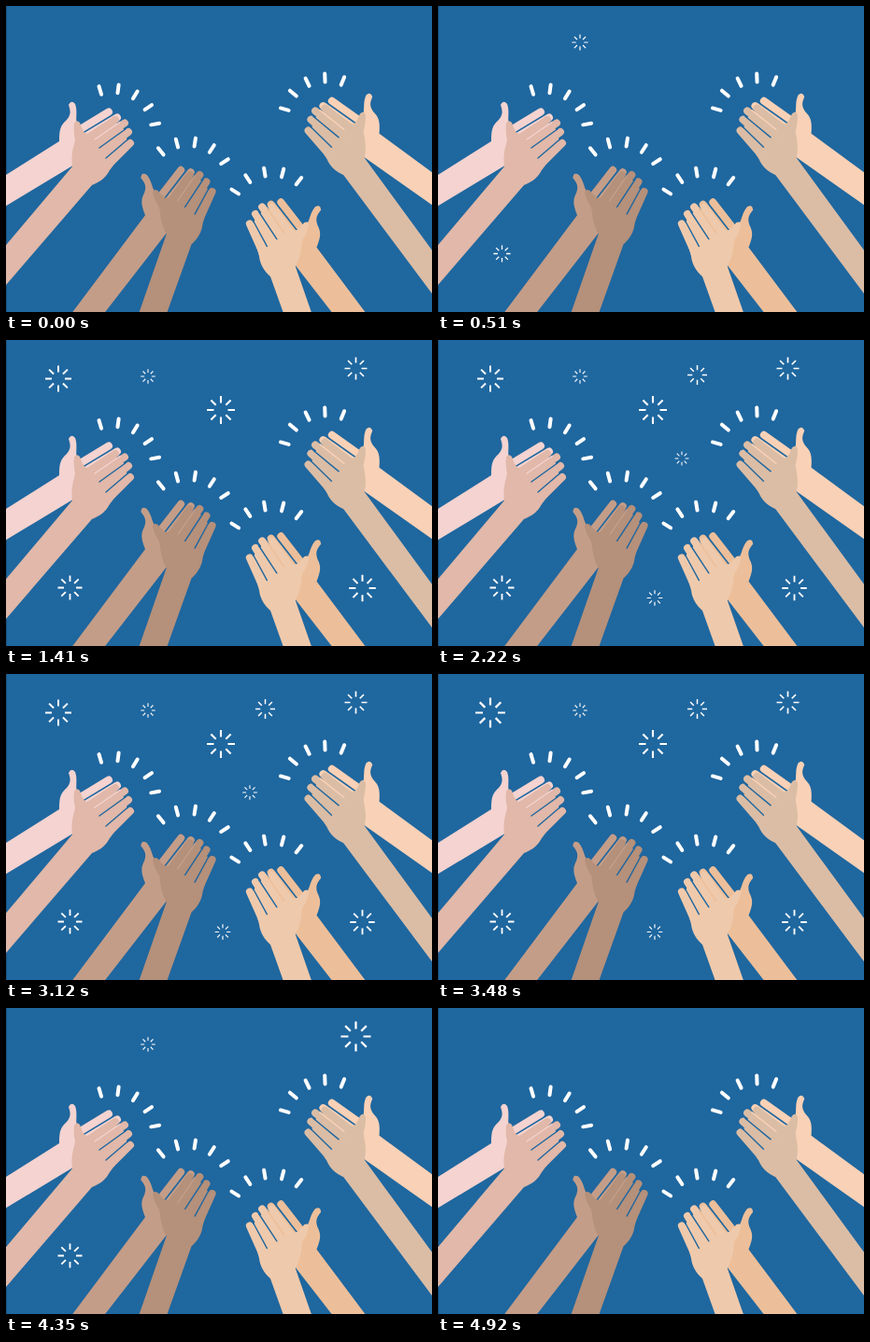
An HTML page for the animation above (5.25 s loop, 456 by 328 pixels).

```html
<!DOCTYPE html>
<html lang="en">
<head>
<meta charset="utf-8">
<title>Applause</title>
<style>
  html, body { margin: 0; width: 100%; height: 100%; overflow: hidden; background: #1f679f; }
  svg { display: block; width: 456px; height: 328px; }
</style>
</head>
<body>
<svg viewBox="0 0 456 328" fill="none" stroke-linecap="round">
  <defs>
    <g id="back" fill="var(--back)" stroke="var(--back)">
      <path stroke="none" d="M67 106Q70 100 74 105C77 113 74 120 76 128L90 150L84 163.5L-130 293L-140 269L57 145C57 133 58 128 65 122C70 116 69 112 67 106Z"/>
      <path stroke-width="8" d="M110 113.5L78 133M119 119.5L85 140"/>
    </g>
    <g id="front" fill="var(--front)" stroke="var(--front)">
      <path stroke="none" d="M73 126Q75 121 79 125C81 130 82 136 87 137L114 124L124 128L128.5 137.5L130.5 149.5L111 176C107 184 100 189 92 192L-92 406L-118 396L71 172C69 158 73 150 74 143Q72 135 73 126Z"/>
      <path stroke-width="8" d="M117 122L88 141M127 125.5L93 148M131 135L99 159M133 147L108 172"/>
      <path stroke="var(--back)" stroke-width="1.4" d="M122 124.5L95 143"/>
      <path stroke="#1f679f" stroke-width="1.4" d="M128.5 131.5L100 152M131.5 142L107 163"/>
    </g>
    <path id="rays" stroke="#fff" stroke-width=".14" stroke-linecap="butt"/>
  </defs>
  <path fill="#1b5685" d="M0 0h1v328h-1z"/>
  <g id="hands"></g>
  <path id="claps" stroke="#fff" stroke-width="4"/>
  <g id="bursts"></g>
</svg>
<script>
const LOOP = 5250, STEP = 30;
const byId = id => document.getElementById(id);

// count strokes around a centre, from radius r1 to r2; angles in degrees
function spokes(x, y, r1, r2, first, step, count) {
  return Array.from({ length: count }, (_, i) => {
    const a = (first + i * step) * Math.PI / 180, c = Math.cos(a), s = Math.sin(a);
    return `M${x + r1 * c} ${y + r1 * s}L${x + r2 * c} ${y + r2 * s}`;
  }).join('');
}

const pairs = [
  { thumb: [71, 103], flip: 1, turn: 0, back: '#f4d3d0', front: '#e1b8a9', clap: [114, 135], first: -106.5 },
  { thumb: [147, 180], flip: 1, turn: -21, back: '#c49d88', front: '#b5907a', clap: [195, 192], first: -129 },
  { thumb: [334.5, 214.5], flip: -1, turn: -21, back: '#ecbf9a', front: '#efc9ab', clap: [284.5, 224], first: -147.5 },
  { thumb: [388.5, 94], flip: -1, turn: -4, back: '#f9d1b6', front: '#dbbda5', clap: [343, 123.5], first: -164 }
];
byId('hands').innerHTML = pairs.map(({ thumb, flip, turn, back, front }) =>
  `<g style="--back:${back};--front:${front}"
    transform="translate(${thumb}) scale(${flip} 1) rotate(${turn}) translate(-71 -103)">
    <use href="#back"/><use href="#front"/></g>`).join('');
byId('claps').setAttribute('d', pairs.map(p => spokes(...p.clap, 42, 51, p.first, 24, 5)).join(''));
byId('rays').setAttribute('d', spokes(0, 0, .5, 1, 0, 45, 8));

// x, y, resting radius, place in the exit order; listed in entry order
const bursts = [
  [152, 39, 7.8, 8],
  [68.5, 265.5, 13, 7],
  [374.5, 30.5, 12, 6],
  [56, 41.5, 14, 1],
  [230, 75, 15, 4],
  [381.5, 266, 13.2, 2],
  [232, 276.5, 8.3, 5],
  [277.5, 37.5, 10.5, 3],
  [261, 127, 7.2, 0]
];
byId('bursts').innerHTML = bursts.map(() => '<use href="#rays"/>').join('');
const marks = [...byId('bursts').children];

// straight from a to b to c, turning at time mid and resting after end
function via(t, a, b, c, mid, end) {
  if (t <= 0) return a;
  if (t < mid) return a + (b - a) * t / mid;
  return t < end ? b + (c - b) * (t - mid) / (end - mid) : c;
}

function draw(now) {
  const t = Math.floor(now % LOOP / STEP) * STEP;
  bursts.forEach(([x, y, rest, exit], i) => {
    const peak = rest + 5.5;
    const enter = t - 205 - i * 212, leave = t - 3100 - exit * 188;
    const r = leave > 0
      ? via(leave, rest, peak, 0, 165, 314)
      : via(enter, 0, peak, rest, 190, 325);
    marks[i].setAttribute('transform', `translate(${x} ${y}) scale(${r})`);
    marks[i].setAttribute('visibility', r > 0 ? 'visible' : 'hidden');
  });
}

let start;
function tick(now) {
  start ??= now;
  draw(now - start);
  requestAnimationFrame(tick);
}
draw(0);
requestAnimationFrame(tick);
</script>
</body>
</html>
```
